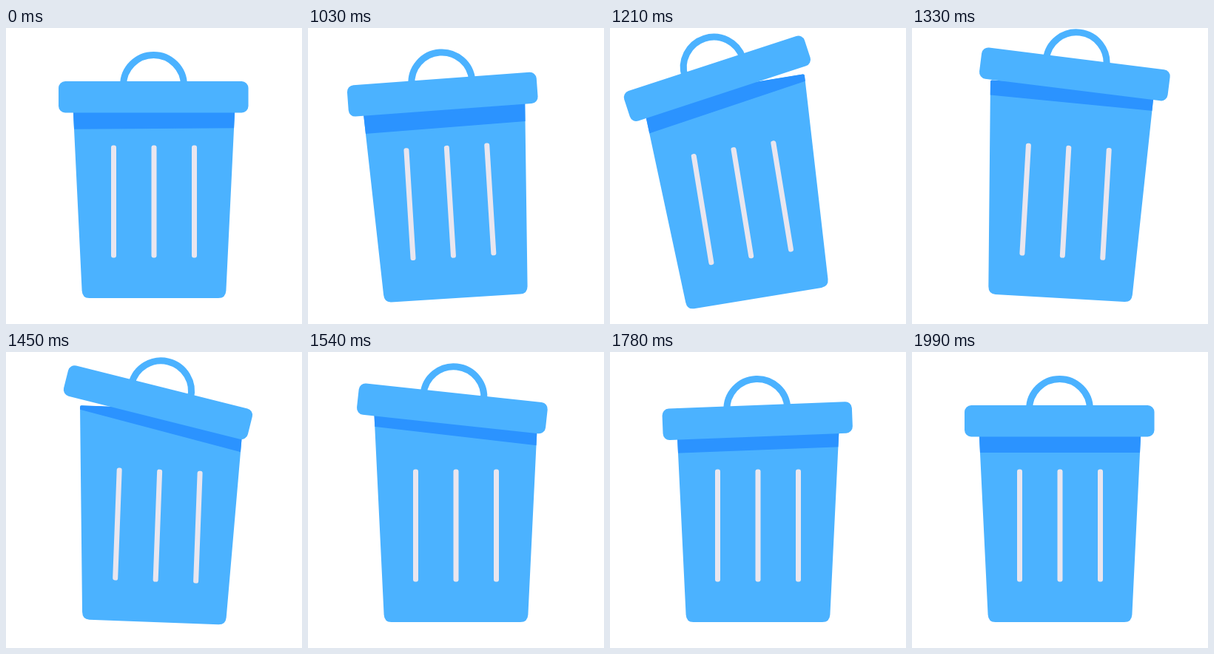
An HTML page for the animation above (2020 ms loop, 400x400 px).

```html
<!DOCTYPE html>
<html lang="en">
<head>
<meta charset="utf-8">
<title>Bin</title>
<style>
  html, body { margin: 0; width: 100%; height: 100%; overflow: hidden; background: #fff; }
  svg { display: block; width: 100%; height: 100%; }
</style>
</head>
<body>
<svg viewBox="0 0 400 400">
  <defs>
    <path id="shell" d="M91.5 76.2H308.5Q311 76.2 310.8 78.7L297.4 355Q296.8 365 287 365H112.5Q103.2 365 102.6 355L89.2 78.7Q89 76.2 91.5 76.2Z"/>
    <clipPath id="inside"><use href="#shell"/></clipPath>
    <rect id="bar" x="-3.5" y="158.5" width="7" height="152" rx="3" fill="#e9e6ef"/>
  </defs>
  <g id="bin" fill="#4bb2ff">
    <use href="#shell"/>
    <g clip-path="url(#inside)">
      <rect id="shade" x="-50" y="-100" width="500" height="236" fill="#2b93ff"/>
    </g>
    <use href="#bar" x="145.5"/>
    <use href="#bar" x="200"/>
    <use href="#bar" x="254.5"/>
    <g id="lid">
      <path d="M158.5 77.5A41 41 0 0 1 240.5 77.5" fill="none" stroke="#4bb2ff" stroke-width="9"/>
      <rect x="71" y="72" width="256.5" height="42.5" rx="9"/>
    </g>
  </g>
</svg>
<script>
const LOOP = 2020, START = 1030, STEP = 30;
const [bin, lid, shade] = ['bin', 'lid', 'shade'].map(id => document.getElementById(id));

// Sine ease from 0 to 1 between two times.
function ease(t, from, to) {
  const u = Math.min(1, Math.max(0, (t - from) / (to - from)));
  return (1 - Math.cos(Math.PI * u)) / 2;
}

function pose(el, x, y, turn, pivotX, pivotY) {
  el.setAttribute('transform', `translate(${x} ${y}) rotate(${turn} ${pivotX} ${pivotY})`);
}

function draw(ms) {
  // The bin rests until START, then moves in fixed steps.
  const t = ms < START ? 0 : START + Math.floor((ms - START) / STEP) * STEP;
  const move = (amount, from, to) => amount * ease(t, from, to);

  // The bin tips left, rocks right and settles.
  const binTurn = move(-10.3, 930, 1180) + move(14.6, 1180, 1360) + move(-4.3, 1360, 1540);

  // The lid pops up, wobbles on its own and drops back.
  const lidLift = move(31.8, 960, 1255) - move(31.8, 1300, 1800);
  const lidShift = move(-6.2, 1000, 1190) + move(9.6, 1190, 1310)
    + move(-8.4, 1310, 1460) + move(5, 1460, 1800);
  const lidTurn = move(-9.5, 1000, 1180) + move(21.5, 1180, 1440)
    + move(-15.2, 1440, 1675) + move(3.2, 1675, 1960);

  // The lid's shadow follows it a little late.
  const shadeLift = move(36, 988, 1270) - move(36, 1270, 1910);
  const shadeTurn = -0.4 + move(-9.1, 1000, 1190) + move(22.3, 1190, 1460)
    + move(-16.3, 1460, 1650) + move(3.5, 1650, 1960);

  pose(bin, 0, 0, binTurn, 200, 365);
  pose(lid, lidShift, -lidLift, lidTurn, 199, 93);
  pose(shade, 0, -shadeLift, shadeTurn, 200, 136);
}

const origin = performance.now();
function tick() {
  draw((performance.now() - origin) % LOOP);
  requestAnimationFrame(tick);
}
tick();
</script>
</body>
</html>
```
